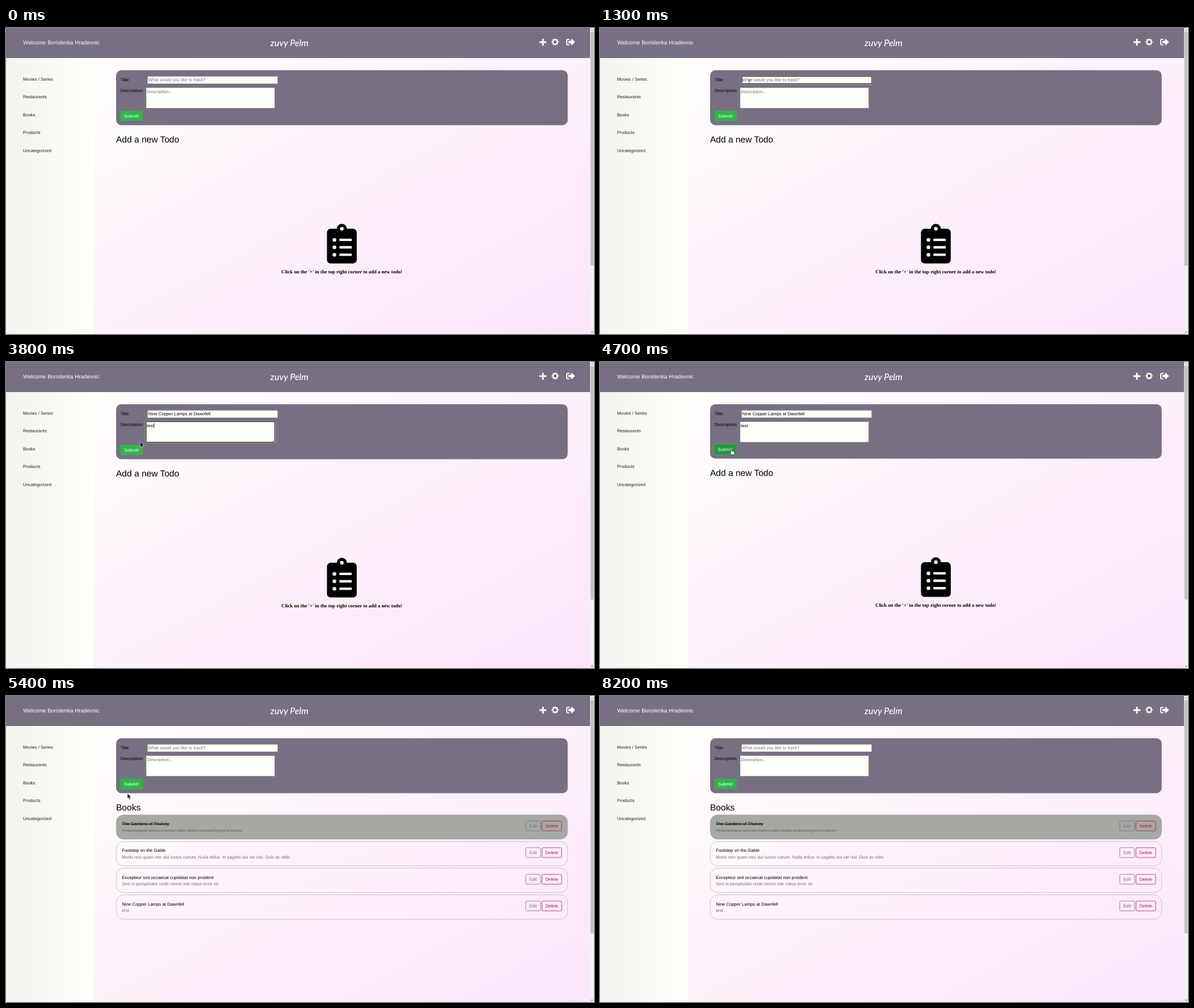
Animation of 1036x540 px, one loop 8300 ms. Source, as an HTML page:

```html
<!DOCTYPE html>
<html lang="en">
<head>
<meta charset="utf-8">
<title>Todo list</title>
<style>
  html, body { margin: 0; width: 100%; height: 100%; overflow: hidden; }
  svg { display: block; width: 100vw; height: 100vh; }
  text { font: 7.77px "Liberation Sans", Arial, sans-serif; text-rendering: geometricPrecision; }
  .welcome { font-size: 9.71px; }
  .brand { font: italic 500 16px Lato, sans-serif; }
  .heading { font-size: 15.54px; }
  .hint { font: bold 8.72px "Liberation Serif", Times, serif; }
  .gray { fill: #757575; }
  .struck { text-decoration: line-through; }
  .mid { text-anchor: middle; }
</style>
</head>
<body>
<script>
const LOOP = 8300;
const PURPLE = '#796f82', IVORY = '#fffffa', RED = '#b3194f';
const NEW_TITLE = 'Nine Copper Lamps at Dawnfell';

const text = (x, y, str, attrs = '') => `<text x="${x}" y="${y}" ${attrs}>${str}</text>`;
const rect = (x, y, w, h, attrs = '') =>
  `<rect x="${x}" y="${y}" width="${w}" height="${h}" ${attrs}/>`;

const sidebar = ['Movies / Series', 'Restaurants', 'Books', 'Products', 'Uncategorized']
  .map((label, i) => text(29.9, 92.9 + 31.45 * i, label, 'fill="#212529"')).join('');

const gearTeeth = Array.from({ length: 8 }, (_, i) =>
  rect(-1.25, -6.2, 2.5, 2.8, `rx=".6" transform="rotate(${i * 45})"`)).join('');

const clipboard = `
  <g transform="translate(565.5 345.5) scale(.1367)">
    <path fill-rule="evenodd" d="M336 64h-80a64 64 0 0 0-128 0H48a48 48 0 0 0-48 48v352a48 48 0 0 0 48 48h288
      a48 48 0 0 0 48-48V112a48 48 0 0 0-48-48zM192 40a24 24 0 1 1 0 48a24 24 0 1 1 0-48z"/>
    <g fill="#fdf2fb">${[208, 304, 400].map(y =>
      `<circle cx="96" cy="${y}" r="24"/>` + rect(160, y - 16, 160, 32, 'rx="8"')).join('')}</g>
  </g>`;

function outlineButton(x, y, w, label, color) {
  return rect(x, y, w, 17.3, `rx="2" fill="none" stroke="${color}" stroke-width=".8"`) +
    text(x + w / 2, y + 11.4, label, `class="mid" fill="${color}"`);
}

function todoItem([title, note, done], i) {
  const y = 209.8 + 47.05 * i;
  const struck = done ? 'struck' : '';
  return rect(194.2, y, 795.4, 43, `rx="13" fill="${done ? '#a6a8a3' : 'none'}" stroke="#aaa5ab" stroke-width=".6"`) +
    text(204.2, y + 18.6, title, `class="${struck}"`) +
    text(204.2, y + 30.1, note, `class="gray ${struck}"`) +
    outlineButton(915.8, y + 10.9, 26, 'Edit', PURPLE) +
    outlineButton(944.4, y + 10.9, 34.6, 'Delete', RED) +
    (done ? rect(942, y + 19.3, 2.4, .8, `fill="${RED}"`) : '');
}

const todos = [
  ['The Gardens of Thulvey', 'Pellentesque ultrices mattis odio. Nulla suscipit ligula in lacus.', true],
  ['Footstep on the Gable', 'Morbi non quam nec dui luctus rutrum. Nulla tellus. In sagittis dui vel nisl. Duis ac nibh.'],
  ['Excepteur sint occaecat cupidatat non proident', 'Sed ut perspiciatis unde omnis iste natus error sit.'],
  [NEW_TITLE, 'test']
].map(todoItem).join('');

const focusRing = (id, x, y, w, h) => `<g id="${id}" fill="none">
  ${rect(x - .6, y - .6, w + 1.2, h + 1.2, `id="${id}Halo" rx="1.2" stroke="#fff" stroke-width="1"`)}
  ${rect(x, y, w, h, 'rx=".8" stroke="#101010" stroke-width="1.1"')}</g>`;

document.body.innerHTML = `
<svg viewBox="0 0 1036 540" preserveAspectRatio="none">
  <defs>
    <linearGradient id="page" gradientUnits="userSpaceOnUse" x1="385" y1="-75" x2="799" y2="668">
      <stop stop-color="#fffefb"/><stop offset=".5" stop-color="#fdf1fb"/><stop offset="1" stop-color="#fbe4f9"/>
    </linearGradient>
    <linearGradient id="side"><stop stop-color="#f3f4ef"/><stop offset="1" stop-color="${IVORY}"/></linearGradient>
  </defs>
  ${rect(0, 0, 1036, 540, 'fill="url(#page)"')}
  ${rect(0, 53, 155, 487, 'fill="url(#side)"')}
  ${rect(0, 0, 1029, 53, `fill="${PURPLE}"`)}
  ${text(30.2, 28.6, 'Welcome Borislenka Hradevnic', `class="welcome" fill="${IVORY}"`)}
  ${text(499.5, 31.5, 'zuvy Pelm', 'class="brand mid" fill="#fff"')}
  <g fill="${IVORY}">
    ${rect(939.8, 23.6, 12.4, 2.9, 'rx=".6"')}${rect(944.55, 18.9, 2.9, 12.4, 'rx=".6"')}
    <g transform="translate(967.5 24.6)">${gearTeeth}
      <circle r="3.8" fill="${PURPLE}" stroke="${IVORY}" stroke-width="1.9"/></g>
    <path transform="translate(987 17) scale(.0303)" d="M497 273L329 441c-15 15-41 4-41-17v-96H152a24 24 0 0 1-24-24v-96
      a24 24 0 0 1 24-24h136V88c0-21 26-32 41-17l168 168a24 24 0 0 1 0 34zM192 436v-40a12 12 0 0 0-12-12H96a32 32 0 0 1-32-32
      V160a32 32 0 0 1 32-32h84a12 12 0 0 0 12-12V76a12 12 0 0 0-12-12H96a96 96 0 0 0-96 96v192a96 96 0 0 0 96 96h84
      a12 12 0 0 0 12-12z"/>
  </g>
  ${sidebar}
  ${rect(1029, 0, 7, 540, 'fill="#f1f1f1"')}
  ${rect(1029.8, 6.8, 5.6, 412.4, 'fill="#c1c1c1"')}
  <path d="M1030.8 4.2l1.8-2 1.8 2z" fill="#777"/><path d="M1030.8 536l1.8 2 1.8-2z" fill="#505050"/>

  ${rect(194, 74.5, 795.7, 97, `id="card" rx="9.5" fill="${PURPLE}"`)}
  ${text(201.7, 94, 'Title:')}
  ${text(201.7, 113.1, 'Description:')}
  <g fill="${IVORY}" stroke="#77717c" stroke-width=".5">
    ${rect(249.3, 85.2, 229.5, 13.2)}${rect(246.9, 105.2, 226.6, 36.4)}
  </g>
  ${focusRing('titleRing', 249.2, 85.1, 229.8, 13.3)}
  ${focusRing('noteRing', 246.9, 105.1, 226.7, 36.5)}
  ${text(250.6, 94, '', 'id="title"')}
  ${text(248.1, 114.6, '', 'id="note"')}
  <path id="grip" d="M469.3 140.8l3.4-3.4m-1.5 3.4l1.5-1.5" stroke="#666" stroke-width=".5"/>
  ${rect(0, 0, .7, 8.6, 'id="caret"')}
  <g id="submit">
    ${rect(200.8, 145.4, 40.8, 19.2, 'id="glow" rx="3" fill="none" stroke="#32b44a" stroke-width="1.7"')}
    ${rect(201.7, 146.2, 39.1, 17.7, 'id="button" rx="2"')}
    ${text(221.2, 157.8, 'Submit!', 'class="mid" fill="#fff"')}
  </g>

  <g id="below">
    ${text(194, 202.2, '', 'id="heading" class="heading"')}
    <g id="empty">${clipboard}
      ${text(591.8, 432.6, "Click on the '+' in the top right corner to add a new todo!", 'class="hint mid"')}</g>
    <g id="list">${todos}</g>
  </g>

  <path id="arrow" d="M0 0v9.2l2.1-1.9 1.5 3.3 1.6-.7-1.5-3.2h2.9z" fill="#151515" stroke="#fff" stroke-width=".5"/>
  <path id="beam" d="M-1.4-3.7q1.2 0 1.4.7q.2-.7 1.4-.7M0-3v6M-1.4 3.7q1.2 0 1.4-.7q.2.7 1.4.7"
    fill="none" stroke="#222" stroke-width=".8"/>
  <path id="hand" d="M-.9.8Q-.9 0 0 0T.9.8V4q1.4-.4 1.7.4q1.4-.4 1.7.5q1.5-.2 1.5 1V8q0 1.4-1 2.6H-.2
    q-.8-1.6-2.5-3.7q-.3-1.1.8-1L-.9 6.7z" fill="#fff" stroke="#111" stroke-width=".7"/>
</svg>`;

const $ = id => document.getElementById(id);
const show = (id, on) => $(id).setAttribute('display', on ? 'inline' : 'none');
const within = (t, from, to) => t >= from && t < to;

// Pointer path: time, x, y. Equal neighbours are rests.
const path = [
  [400, 17, 212], [700, 92, 172], [1000, 208, 118], [1200, 263, 95], [1600, 263, 95],
  [1900, 267, 122], [3300, 267, 122], [3800, 236.4, 141], [4200, 231.5, 153], [5300, 231.5, 153.2],
  [5400, 214, 172], [5500, 171, 197], [5600, 171, 197], [5700, 184.5, 359.5], [5800, 184.5, 359.5],
  [6200, 413.7, 379.6], [6500, 535.5, 379], [6900, 535.5, 379], [7000, 407, 167], [7200, 407, 167]
];

function pointerAt(t) {
  const i = Math.max(1, path.findIndex(p => p[0] >= t));
  const [t0, x0, y0] = path[i - 1], [t1, x1, y1] = path[i];
  const k = (t - t0) / (t1 - t0);
  return [x0 + (x1 - x0) * k, y0 + (y1 - y0) * k];
}

function drawPointer(t) {
  let kind = '';
  if (within(t, 400, 7200)) {
    const [x, y] = pointerAt(t);
    const overTitle = x > 249 && x < 479 && y > 85 && y < 99;
    const overNote = x > 247 && x < 474 && y > 105 && y < 142;
    kind = overTitle || overNote ? 'beam' : within(t, 4000, 5400) ? 'hand' : 'arrow';
    $(kind).setAttribute('transform', `translate(${x} ${y})`);
  }
  ['arrow', 'beam', 'hand'].forEach(id => show(id, id === kind));
}

function drawField(id, value, placeholder) {
  $(id).textContent = value || placeholder;
  $(id).setAttribute('class', value ? '' : 'gray');
}

function drawCaret(t) {
  const inTitle = within(t, 1300, 2100);
  const field = $(inTitle ? 'title' : 'note');
  const filled = inTitle ? t >= 1600 : t >= 3200;
  const x = +field.getAttribute('x') + (filled ? field.getComputedTextLength() : 0);
  $('caret').setAttribute('x', x);
  $('caret').setAttribute('y', inTitle ? 87.4 : 107.8);
  show('caret', within(t, 1300, 2700) || within(t, 3200, 4200));
}

function render(ms) {
  const t = Math.floor(ms % LOOP / 100) * 100;
  const saved = t >= 5000;
  const hover = within(t, 4000, 5400);

  drawField('title', within(t, 1600, 5000) && NEW_TITLE, 'What would you like to track?');
  drawField('note', within(t, 3200, 5000) && 'test', 'Description...');
  show('grip', within(t, 3200, 5000));
  show('titleRing', within(t, 1200, 2100));
  show('titleRingHalo', t >= 1300);
  show('noteRing', within(t, 1900, 4200));
  show('noteRingHalo', t >= 2100);
  drawCaret(t);

  $('card').setAttribute('height', hover ? 96 : 97);
  $('below').setAttribute('transform', `translate(0 ${hover ? -1 : 0})`);
  $('submit').setAttribute('transform', hover ? 'translate(-.6 -.7)' : '');
  $('button').setAttribute('fill', !hover ? '#32b44a' : t < 4100 ? '#2da544' : '#28963e');
  $('glow').setAttribute('opacity', !within(t, 4200, 8200) ? 0 : t < 4300 || t >= 8100 ? .25 : .5);

  $('heading').textContent = saved ? 'Books' : 'Add a new Todo';
  show('empty', !saved);
  show('list', saved);
  drawPointer(t);
}

function tick(now) {
  render(now);
  requestAnimationFrame(tick);
}
render(0);
requestAnimationFrame(tick);
</script>
</body>
</html>
```
